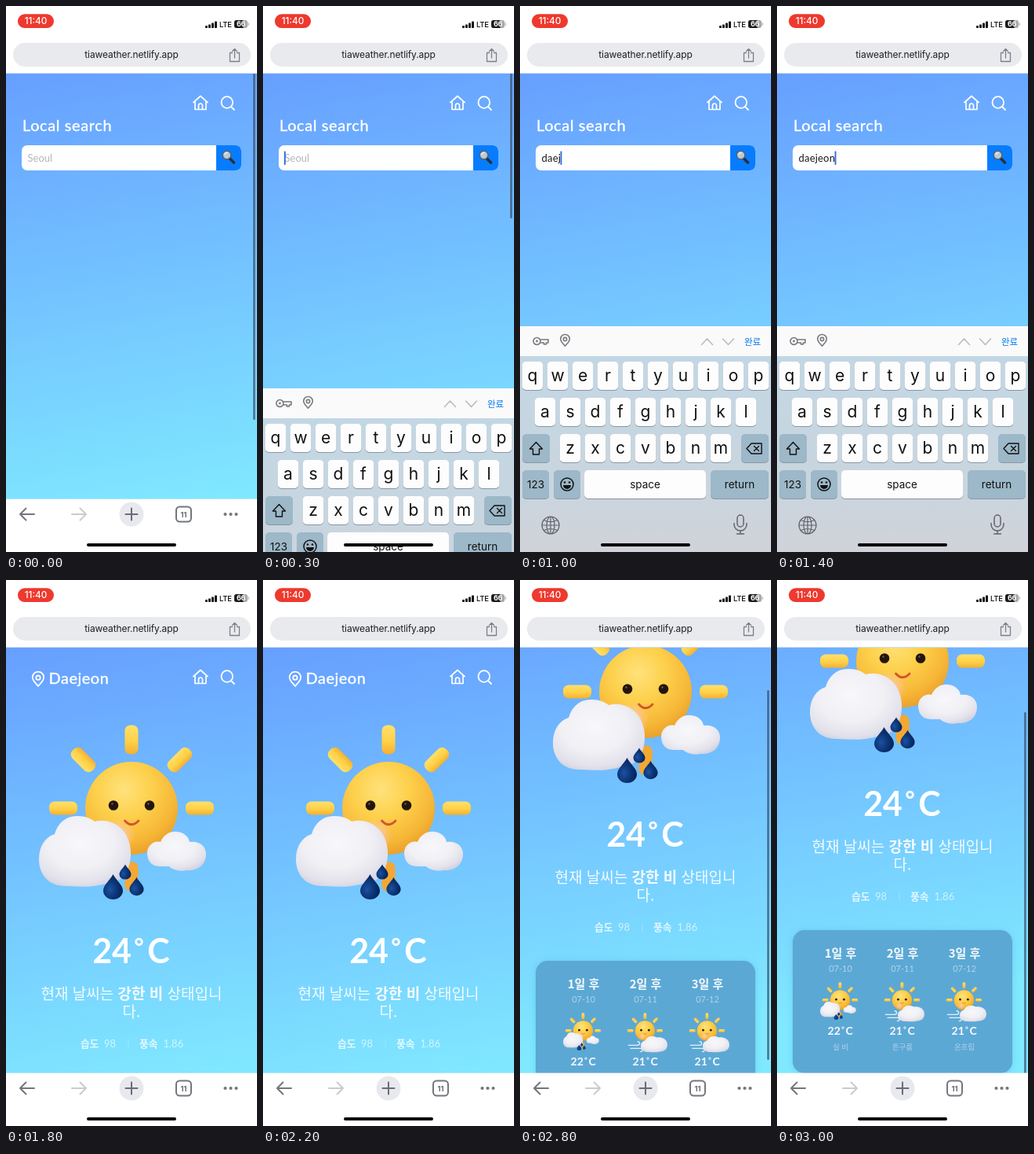
An HTML page that plays this animation: 320x694 px, repeating every 3100 ms.

```html
<!DOCTYPE html>
<html lang="ko">
<head>
<meta charset="utf-8">
<title>Weather</title>
<style>
html, body { margin: 0; width: 100%; height: 100%; overflow: hidden; background: #fff; }
svg { display: block; width: 320px; height: 694px; }
text { white-space: pre; }
.ui { font-family: Inter, "Noto Sans CJK KR", sans-serif; }
.geo { font-family: Lato, "Noto Sans CJK KR", "Noto Sans CJK", sans-serif; }
.medium { stroke: #fff; stroke-width: .4px; }
.ko { font-family: "Noto Sans CJK KR", "Noto Sans CJK", sans-serif; }
.line { fill: none; stroke-linecap: round; stroke-linejoin: round; }
</style>
</head>
<body>
<svg id="stage" viewBox="0 0 320 694"></svg>
<script>
const LOOP = 3100, STEP = 100;
const WORD = 'daejeon';
const TYPE_AT = 7, RESULT_AT = 18;
// vertical keyboard offset by step; hidden elsewhere
const KEYBOARD_H = 287;
const RISE = { 2: 190, 3: 79, 4: 25, 5: 6 };
const FALL = { 15: 45, 16: 170 };
// the content scrolls first, then the page with its backdrop
const SCROLL_FROM = 24, INNER = 73;
const SCROLL = [6, 35, 73, 112, 148, 174, 187];

const text = (x, y, size, str, o = {}) =>
  `<text class="${o.cls || 'ui'}" x="${x}" y="${y}" font-size="${size}" fill="${o.fill || '#111'}"
    font-weight="${o.weight || 400}" text-anchor="${o.anchor || 'middle'}"
    letter-spacing="${o.gap || 0}" opacity="${o.alpha || 1}">${str}</text>`;
const rect = (x, y, w, h, r, fill, more = '') =>
  `<rect x="${x}" y="${y}" width="${w}" height="${h}" rx="${r}" fill="${fill}" ${more}/>`;
const circle = (x, y, r, fill, more = '') =>
  `<circle cx="${x}" cy="${y}" r="${r}" fill="${fill}" ${more}/>`;
const line = (d, color, w = 1.8, more = '') =>
  `<path class="line" d="${d}" stroke="${color}" stroke-width="${w}" ${more}/>`;
const shape = (d, fill, more = '') => `<path d="${d}" fill="${fill}" ${more}/>`;
const group = (id, body) => `<g id="${id}">${body}</g>`;
const stops = list => list.map(([at, c]) => `<stop offset="${at}" stop-color="${c}"/>`).join('');
const radial = (id, cx, cy, r, list) =>
  `<radialGradient id="${id}" cx="${cx}" cy="${cy}" r="${r}">${stops(list)}</radialGradient>`;

const defs = `<defs>
  <linearGradient id="sky" gradientUnits="userSpaceOnUse" x1="109" y1="66" x2="211" y2="646">
    ${stops([[0, '#679fff'], [1, '#80e9ff']])}</linearGradient>
  <linearGradient id="board" x1="0" y1="0" x2="0" y2="1">
    ${stops([[0, '#c2d7e4'], [.7, '#cad5de'], [1, '#d1d2d9']])}</linearGradient>
  <linearGradient id="ray" x1="0" y1="0" x2="0" y2="1">
    ${stops([[0, '#ffe06a'], [.55, '#ffd148'], [1, '#f4b032']])}</linearGradient>
  ${radial('ball', .42, .3, .76, [[0, '#ffe27c'], [.4, '#fdd04b'], [.75, '#f6b636'], [1, '#e59a2a']])}
  ${radial('puff', .45, .38, .66, [[0, '#f8f8fb'], [.55, '#f0f0f5'], [.85, '#e3e2eb'], [1, '#d3d3e3']])}
  ${radial('blush', .5, .5, .5, [[0, '#ffc9b8'], [1, '#ffc9b800']])}
  ${radial('drop', .35, .6, .7, [[0, '#1c51a0'], [.5, '#0b3577'], [1, '#041e50']])}
  <clipPath id="view"><rect x="0" y="85" width="320" height="542"/></clipPath>
  <filter id="soft" x="-10%" y="-10%" width="120%" height="125%">
    <feDropShadow dx="0" dy="1" stdDeviation="4" flood-color="#2b6f9c" flood-opacity=".2"/></filter>
</defs>`;

const pin = (x, y, s, color, w) =>
  line('M0 10C-4 5-8 2-8-2.500a8 8 0 0 1 16 0C8 2 4 5 0 10ZM-3-2a3 3 0 1 0 6 0a3 3 0 1 0-6 0Z',
    color, w, `transform="translate(${x} ${y}) scale(${s})"`);

function ray(angle) {
  const a = angle * Math.PI / 180, x = 160 + 87 * Math.cos(a), y = 290 + 87 * Math.sin(a);
  const across = angle % 180 === 0, upright = Math.abs(angle) === 90;
  if (across) return rect(x - 18, y - 8.5, 36, 17, 7, 'url(#ray)');
  if (upright) return rect(x - 8.5, y - 18.5, 17, 37, 7, angle > 0 ? '#f3a834' : 'url(#ray)');
  return rect(x - 18, y - 8.5, 36, 17, 7, 'url(#ray)', `transform="rotate(${angle} ${x} ${y})"`);
}

const sun = [-180, -135, -90, -45, 0, 90].map(ray).join('') +
  circle(160, 290, 59, 'url(#ball)') +
  circle(144, 324, 21, 'url(#blush)') +
  [137, 183].map(x => circle(x, 286.500, 6.3, '#24150c') + circle(x - 1.5, 284.500, 1.2, '#6e5a4c')).join('') +
  line('M151.500 306Q160 315.500 169 306', '#d5542f', 2.8);

const bigCloud = shape(`M78 389C54 390 42 374 42 355C42 338 50 327 62 323C66 308 78 299 92 300
  C101 300 108 303 113 307C137 301 158 319 159 345C160 370 147 386 128 386C110 391 94 390 78 389Z`, 'url(#puff)');
const smallCloud = shape(`M196 364C184 364 180 355 180 347C180 337 189 331 197 333C202 322 211 319 218 320
  C228 321 233 327 234 333C248 331 256 340 255 350C254 364 242 370 230 369C222 371 212 368 208 364Z`, 'url(#puff)');
const drop = (x, y, s) => shape('M0-16C3-9 12.500-3 12.500 5A12.500 11 0 0 1-12.500 5C-12.500-3-3-9 0-16Z',
  'url(#drop)', `transform="translate(${x} ${y}) scale(${s})"`);

const rainy = sun + bigCloud + smallCloud + drop(152, 371, .6) + drop(166.500, 389.500, .73) + drop(136.500, 390, 1);
const breezy = sun +
  line('M62 376H114C134 376 132 350 116 355M74 394H132C150 396 146 418 132 413', '#e6f1fa', 6) +
  `<g transform="translate(78 8) scale(1.35 1.05)">${bigCloud}</g>`;

// digits, a small raised ring and the unit
function degrees(x, y, size, n, alpha) {
  const o = { cls: 'geo', fill: '#fff', weight: 700 };
  return `<g opacity="${alpha}">` +
    text(x - .01 * size, y, size, n, { ...o, anchor: 'end' }) +
    circle(x + .21 * size, y - .63 * size, .088 * size, 'none', `stroke="#fff" stroke-width="${.065 * size}"`) +
    text(x + .46 * size, y, size, 'C', { ...o, anchor: 'start' }) + '</g>';
}

const navIcons =
  line(`M239 122.500L248 114.500L257 122.500M241 121V131.500H255V121
    M245.500 131V126.500A2.500 2.500 0 0 1 250.500 126.500V131`, '#fff', 1.7) +
  line('M274.500 122.500a7.300 7.300 0 1 0 14.600 0a7.300 7.300 0 1 0-14.600 0M287 128L291 132', '#fff', 1.8);

const search = navIcons +
  text(21, 159, 20, 'Local search', { cls: 'geo medium', fill: '#fff', anchor: 'start', gap: .6 }) +
  rect(20, 177, 280, 32, 7, '#fff') +
  shape('M268 177H293a7 7 0 0 1 7 7V202a7 7 0 0 1-7 7H268Z', '#087cff') +
  line('M285.500 194L290.500 199', '#2c2f35', 3.6) +
  circle(281.500, 189.500, 5.3, '#b8cbd6', 'stroke="#59626c" stroke-width="1.5"') +
  line('M279 188.500Q280 186.500 282 186.500', '#f2f8fb', 1.2) +
  `<text id="field" class="geo" x="27.500" y="197.500" font-size="13"></text>` +
  rect(27, 184.500, 1.8, 17.500, .8, '#2c68d8', 'id="caret"');

function day(i, when, date, icon, temp, sky) {
  const x = 81 + 79 * i;
  return text(x, 667, 15, when, { cls: 'ko', fill: '#fff', weight: 700, alpha: .95 }) +
    text(x, 685, 11, date, { cls: 'geo', fill: '#fff', alpha: .5 }) +
    `<g transform="translate(${x - 2} 722) scale(.215) translate(-153.500 -295)">${icon}</g>` +
    degrees(x, 765, 14, temp, .95) +
    text(x, 784, 9.500, sky, { cls: 'ko', fill: '#fff', alpha: .5 });
}

const result = navIcons + pin(41, 126, .9, '#fff', 2) +
  text(54.500, 132, 20, 'Daejeon', { cls: 'geo medium', fill: '#fff', anchor: 'start', gap: .5 }) +
  rainy +
  degrees(160.500, 487, 43, '24', 1) +
  text(160, 533, 19, '현재 날씨는 <tspan font-weight="700">강한 비</tspan> 상태입니',
    { cls: 'ko', fill: '#fff', weight: 300, alpha: .92 }) +
  text(160, 556, 19, '다.', { cls: 'ko', fill: '#fff', weight: 300, alpha: .92 }) +
  [[95, '습도', 125, '98'], [170, '풍속', 200.500, '1.86']].map(([x, name, vx, value]) =>
    text(x, 594, 12.800, name, { cls: 'ko', fill: '#fff', weight: 700, anchor: 'start', alpha: .8 }) +
    text(vx, 594, 13, value, { cls: 'geo', fill: '#fff', anchor: 'start', alpha: .65 })).join('') +
  rect(155.500, 584, 1, 11, 0, '#fff', 'opacity=".25"') +
  rect(20, 632, 280, 182, 15, '#5ba8d5', 'filter="url(#soft)"') +
  day(0, '1일 후', '07-10', rainy, '22', '실 비') +
  day(1, '2일 후', '07-11', breezy, '21', '튼구름') +
  day(2, '3일 후', '07-12', breezy, '21', '온흐림');

const header = rect(0, 0, 320, 85, 0, '#fff') + rect(0, 85, 320, 1, 0, '#cbdcf5') +
  rect(15, 10.300, 46, 17.700, 8.850, '#ee392e') +
  text(38, 23.300, 11.800, '11:40', { fill: '#fff', weight: 500 }) +
  [3, 4.500, 6.500, 8.500].map((h, i) => rect(254 + 4 * i, 28 - h, 3, h, .8, '#111')).join('') +
  text(272, 27.300, 9.500, 'LTE', { anchor: 'start', weight: 500, gap: -.2 }) +
  rect(291, 18, 17, 10, 3, '#a9a9ad') +
  shape('M294 18H302.500V28H294a3 3 0 0 1-3-3V21a3 3 0 0 1 3-3Z', '#1b1b1d') +
  rect(308.600, 21.300, 1.2, 3.500, .6, '#a9a9ad') +
  text(299.500, 26.400, 9, '66', { fill: '#fff', weight: 700, gap: -.3 }) +
  rect(9, 47, 303, 30, 15, '#e9eaee') +
  text(160, 65.500, 12, 'tiaweather.netlify.app', { fill: '#1d1e21', gap: -.1 }) +
  line('M288.500 59.500H285.500V70.500H297.500V59.500H294.500M291.500 66V54.500M288.500 57.500L291.500 54.500L294.500 57.500', '#7c7f86', 1.3);

const arrow = (x, dir, color) =>
  line(`M${x - 9 * dir} 646H${x + 9 * dir}M${x + 1.5 * dir} 638.500L${x + 9 * dir} 646L${x + 1.5 * dir} 653.500`, color, 2);
const toolbar = rect(0, 627, 320, 67, 0, '#fff') + rect(0, 626.500, 320, .5, 0, '#e4eaf2') +
  arrow(27, -1, '#73767c') + arrow(93, 1, '#c9cbcf') +
  circle(160, 646, 15.500, '#e8e9ee') + line('M152.500 646H167.500M160 638.500V653.500', '#6a6d73', 2) +
  rect(217, 636.500, 19, 19, 4.500, 'none', 'stroke="#73767c" stroke-width="2"') +
  text(226.500, 649.800, 9.500, '11', { fill: '#6a6d73', weight: 700 }) +
  [279.500, 286.500, 293.500].map(x => circle(x, 646, 2.1, '#73767c')).join('');

const key = (x, y, w, fill = '#fdfdfe') =>
  rect(x, y + 1, w, 36, 5, '#8797a3') + rect(x, y, w, 36, 5, fill);
const letters = (row, first, y) => [...row].map((c, i) =>
  key(first + 32 * i - 13.300, y, 26.600) + text(first + 32 * i, y + 24.500, 21, c)).join('');
const DIM = '#9db8c8', GREY = '#60656b';

const keyboard = rect(0, 407, 320, 38.500, 0, '#fafafb') + rect(0, 445, 320, 249, 0, 'url(#board)') +
  line('M17 426a4.500 4.500 0 1 0 9 0a4.500 4.500 0 1 0-9 0M25.500 424H36V428H33.500V430H30.500V428H25.500', '#777a7e', 1.6) +
  circle(21.500, 426, 1.4, '#777a7e') +
  pin(57.500, 425, .72, '#777a7e', 2.2) +
  line('M231.500 430.500L238.500 423L245.500 430.500M258.500 423L265.500 430.500L272.500 423', '#b9bcc0', 1.6) +
  text(296.500, 430.500, 11.500, '완료', { cls: 'ko', fill: '#087cf0', weight: 500 }) +
  letters('qwertyuiop', 16, 452) + letters('asdfghjkl', 32, 498) + letters('zxcvbnm', 64, 544) +
  key(3, 544, 35, DIM) + line('M20.500 554.500L12.500 563H16.500V570H24.500V563H28.500Z', '#111', 1.4) +
  key(282, 544, 35, DIM) +
  line('M295 556H308V569H295L289 562.500ZM298.500 559.500L304.500 565.500M304.500 559.500L298.500 565.500', '#111', 1.4) +
  key(3, 590, 34, DIM) + text(20, 613, 13.500, '123') +
  key(43, 590, 34, DIM) + circle(60, 608, 8, 'none', 'stroke="#111" stroke-width="1.500"') +
  circle(57, 605.500, 1.3, '#111') + circle(63, 605.500, 1.3, '#111') +
  shape('M55 609H65A5 5 0 0 1 55 609Z', '#111') +
  key(82, 590, 155) + text(159.500, 612.500, 13.500, 'space') +
  key(243, 590, 74, DIM) + text(280, 613, 13.500, 'return') +
  line(`M28 660a11 11 0 1 0 22 0a11 11 0 1 0-22 0M34 660a5 11 0 1 0 10 0a5 11 0 1 0-10 0
    M39 649V671M28 660H50M30.500 653.500Q39 657.500 47.500 653.500M30.500 666.500Q39 662.500 47.500 666.500`, GREY, 1.2) +
  rect(277, 647, 8, 15, 4, 'none', `stroke="${GREY}" stroke-width="1.500"`) +
  line('M273 657.500V659a8 8 0 0 0 16 0V657.500M281 667V671M276.500 671H285.500', GREY, 1.5);

const stage = document.getElementById('stage');
stage.innerHTML = defs + rect(0, 85, 320, 542, 0, 'url(#sky)') +
  `<g clip-path="url(#view)">${group('search', search)}${group('result', result)}</g>` +
  header + rect(315.200, 86, 2.4, 440, 1.2, '#3c4d69', 'id="thumb" opacity=".8"') +
  toolbar + group('keyboard', keyboard) +
  rect(103, 683, 114, 4, 2, '#050505');

const $ = id => document.getElementById(id);
const [sky, searchPage, resultPage, board, field, caret, thumb] =
  ['sky', 'search', 'result', 'keyboard', 'field', 'caret', 'thumb'].map($);
const show = (el, on) => el.setAttribute('display', on ? 'inline' : 'none');

function keyboardOffset(n) {
  if (n < 2 || n > 16) return KEYBOARD_H;
  return RISE[n] ?? FALL[n] ?? 0;
}

function setThumb(top, bottom) {
  thumb.setAttribute('y', top);
  thumb.setAttribute('height', bottom - top);
}

function draw(n) {
  const done = n >= RESULT_AT;
  const offset = keyboardOffset(n);
  show(searchPage, !done);
  show(resultPage, done);
  show(board, offset < KEYBOARD_H);
  board.setAttribute('transform', `translate(0 ${offset})`);

  const typed = WORD.slice(0, Math.max(0, n - TYPE_AT + 1));
  field.textContent = typed || 'Seoul';
  field.setAttribute('fill', typed ? '#17181a' : '#b1b4bc');
  field.setAttribute('letter-spacing', typed ? .2 : 0);
  show(caret, n >= 2 && n < 15);
  caret.setAttribute('x', typed && !done ? 27 + field.getComputedTextLength() : 27);

  const scroll = n < SCROLL_FROM ? 0 : SCROLL[n - SCROLL_FROM];
  const outer = Math.max(0, scroll - INNER);
  resultPage.setAttribute('transform', `translate(0 ${-scroll})`);
  sky.setAttribute('gradientTransform', `translate(0 ${-outer})`);
  show(thumb, n < 10 || n >= SCROLL_FROM);
  if (done) {
    const k = outer / 114;
    setThumb(86 + 82 * k, 577 + 50 * k);
  } else {
    setThumb(86, n < 2 ? 526 : 270);
  }
}

const start = performance.now();
let last = -1;
function tick() {
  const n = Math.floor((performance.now() - start) % LOOP / STEP);
  if (n !== last) draw(last = n);
  requestAnimationFrame(tick);
}
tick();
</script>
</body>
</html>
```
